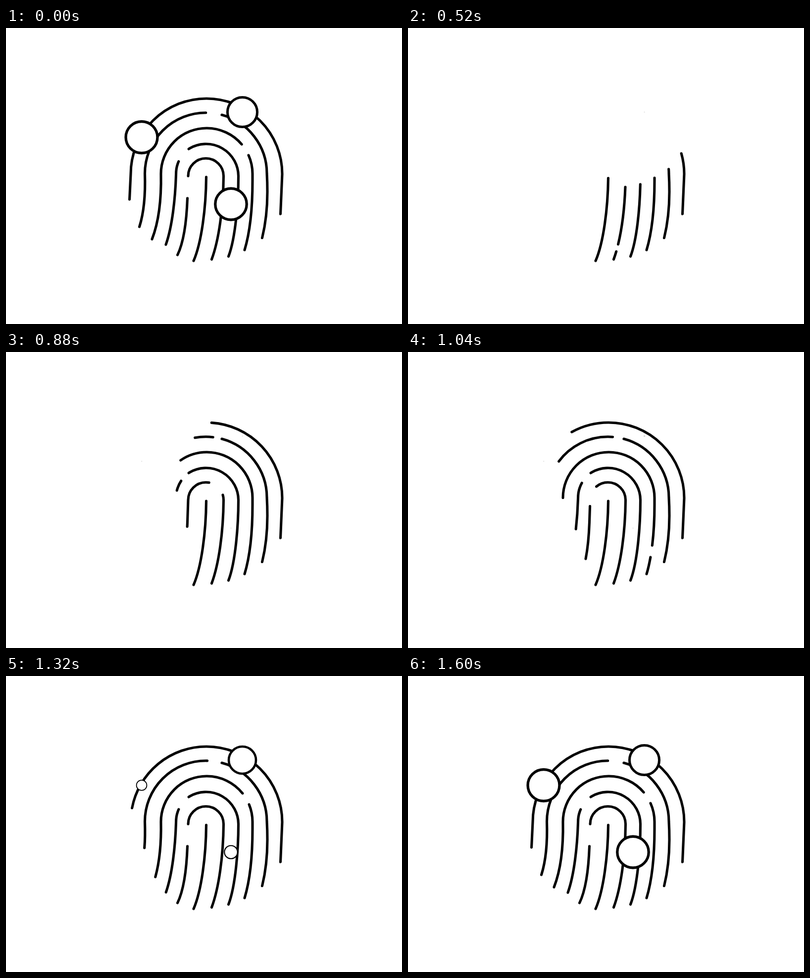
Recreate the animation shown at these times as an HTML page with a canvas. Size 800 by 600 pixels, loop 1640 ms.

```html
<!DOCTYPE html>
<html lang="en">
<head>
<meta charset="utf-8">
<title>Fingerprint</title>
<style>
  html, body { margin: 0; width: 100%; height: 100%; overflow: hidden; background: #fff; }
  canvas { display: block; }
</style>
</head>
<body>
<canvas id="stage" width="800" height="600"></canvas>
<script>
const ctx = document.getElementById('stage').getContext('2d');
const LOOP = 1640, STEP = 40, START = 40;

const progress = (t, start, duration) => Math.min(1, Math.max(0, (t - start) / duration));
const easeInOut = x => x * x * (3 - 2 * x);
const easeOut = x => 1 - (1 - x) ** 2.5;
const mix = (a, b, k) => a + (b - a) * k;

// Ridges from the middle outwards, each drawn from its lower right end.
// `gap` is the final break along the path; with `slide` [start, end] the
// break travels there from the beginning of the path, else it widens in place.
const core = { path: new Path2D('M379 472C395 435 404 365 404.5 302'), length: 173.5 };
const ridges = [
  {
    d: 'M415.5 469C430 430 439 365 439.5 300A35.75 35.75 0 0 0 368 300L366.5 345C365 387 360 432 346.5 460',
    length: 447, gap: [283.5, 328.5], slide: [356, 1205]
  },
  {
    d: 'M449.5 463C464 425 469.5 350 469.5 300A65.5 65.5 0 0 0 371 244C360 251 351 263 347 275C344 283 343.5 290 343.5 297C342 345 336 402 323 439',
    length: 511, gap: [303.8, 336.5]
  },
  {
    d: 'M482 450C494 410 498 355 498 310V295.5A92.5 92.5 0 0 0 313 295.5C314 345 309 392 295 428',
    length: 583, gap: [194.5, 220.5], slide: [880, 1350]
  },
  {
    d: 'M517.5 425.5C524 399 528 366 528 332Q528 312 527 295A123.25 123.25 0 0 0 280.5 295C282 340 279 373 269.5 403',
    length: 628, gap: [292.2, 324.8]
  },
  {
    d: 'M554.5 377L558 296A153 153 0 0 0 252 296L249.5 348',
    length: 622
  }
].map((ridge, i) => ({ ...ridge, path: new Path2D(ridge.d), duration: 1240 + 110 * i }));

const nodes = [
  { x: 477.5, y: 170.5, start: 990 },
  { x: 274, y: 221.5, start: 1155 },
  { x: 454.5, y: 357, start: 1129 }
];

function strokePart(path, from, to) {
  if (to - from < 0.1) return;
  ctx.setLineDash([to - from, 2000]);
  ctx.lineDashOffset = -from;
  ctx.stroke(path);
}

// The break as [end of first piece, start of second piece].
function gapAt({ gap, slide }, t, grown) {
  if (!slide) return [gap[0], mix(gap[0], gap[1], grown)];
  const [start, end] = slide, lag = 45;
  return [
    gap[0] * easeInOut(progress(t, start + lag, end - start - lag)),
    gap[1] * easeInOut(progress(t, start, end - start))
  ];
}

function drawRidge(ridge, t) {
  const grown = easeInOut(progress(t, START, ridge.duration));
  const front = ridge.length * grown;
  const [tail, head] = ridge.gap ? gapAt(ridge, t, grown) : [front, front];
  strokePart(ridge.path, 0, Math.min(tail, front));
  strokePart(ridge.path, head, front);
}

// A node swells past its size, then settles; it shows as a speck beforehand.
function drawNode({ x, y, start }, t) {
  const swell = 432, settle = 170;
  if (t < start - 500) return;
  const size = 34.7 * easeInOut(progress(t, start, swell))
    - 2.1 * easeInOut(progress(t, start + swell, settle));
  const outer = Math.max(0.7, size);
  ctx.lineWidth = outer * 0.155;
  ctx.beginPath();
  ctx.arc(x, y, outer - ctx.lineWidth / 2, 0, Math.PI * 2);
  ctx.fill();
  ctx.stroke();
}

function draw(now) {
  const step = Math.floor((now % LOOP) / STEP) * STEP;
  const t = step || LOOP - STEP; // the loop opens on the finished picture
  ctx.fillStyle = '#fff';
  ctx.strokeStyle = '#000';
  ctx.fillRect(0, 0, 800, 600);
  ctx.lineCap = 'round';
  ctx.lineWidth = 5.1;
  strokePart(core.path, 0, core.length * easeOut(progress(t, START, 600)));
  ridges.forEach(ridge => drawRidge(ridge, t));
  ctx.setLineDash([]);
  nodes.forEach(node => drawNode(node, t));
}

const begin = performance.now();
function tick() {
  draw(performance.now() - begin);
  requestAnimationFrame(tick);
}
tick();
</script>
</body>
</html>
```
